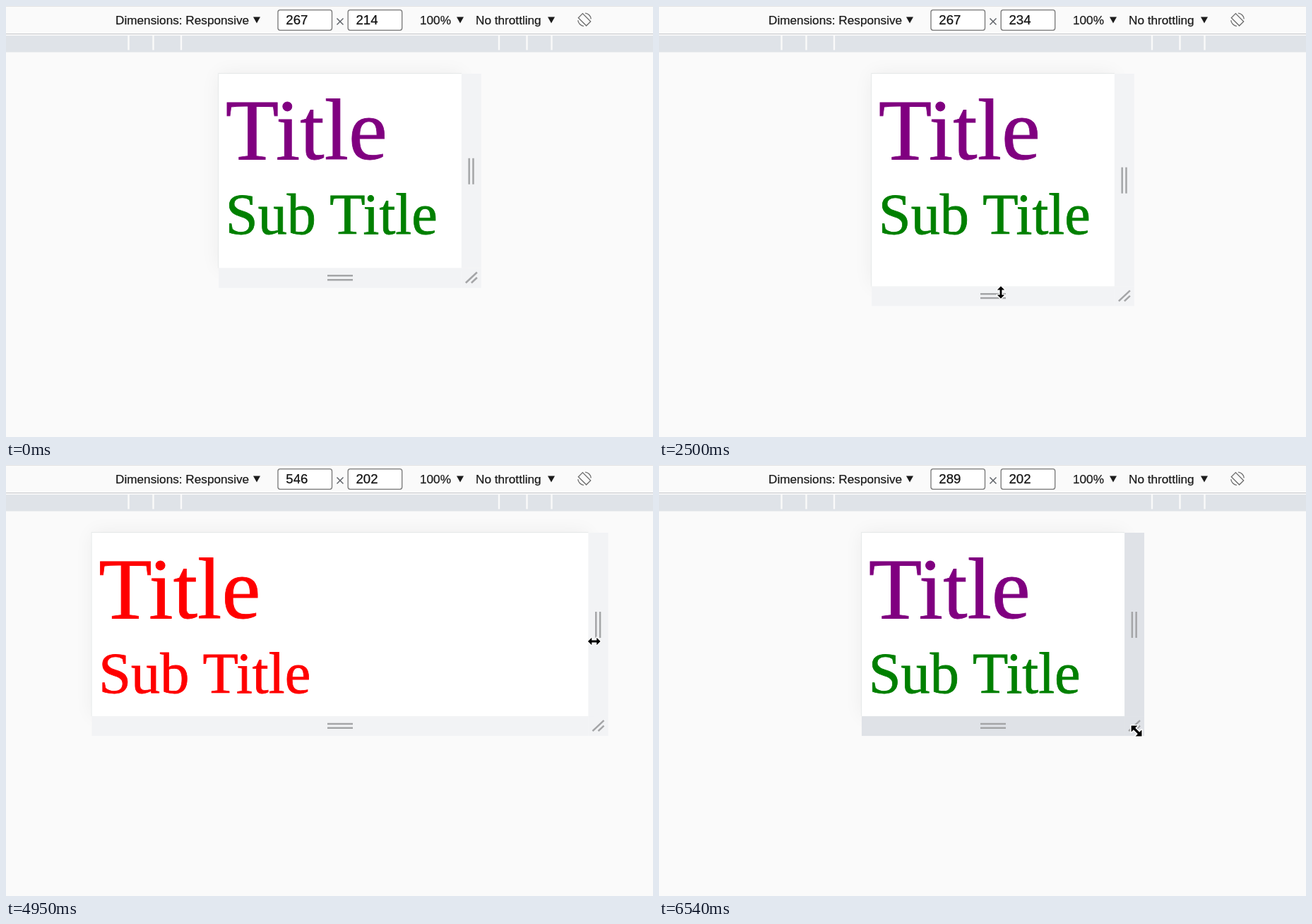
Write an HTML page with a canvas that moves like this. It is 916 px wide and 611 px high and loops after 6640 ms.

```html
<!DOCTYPE html>
<html lang="en">
<head>
<meta charset="utf-8">
<title>Responsive resize</title>
<style>
  html, body { margin: 0; width: 100%; height: 100%; overflow: hidden; background: #fafafa; }
  canvas { display: block; width: 916px; height: 611px; }
</style>
</head>
<body>
<canvas id="stage" width="916" height="611"></canvas>
<script>
const ctx = document.getElementById('stage').getContext('2d');
const LOOP = 6640, STEP = 50, LAST_CHANGE = 6540;
const SCALE = 1.2875, CENTER = 473, TOP = 96, BAR = 28, RED_FROM = 450;
const SANS = '"Liberation Sans", Arial, sans-serif';
const SERIF = '"Liberation Serif", "Times New Roman", serif';

const smooth = x => x * x * (3 - 2 * x);
const easeOut = x => 1 - (1 - x) ** 3;
const ease = (t, start, end, curve = smooth) =>
  curve(Math.min(1, Math.max(0, (t - start) / (end - start))));
const mix = (a, b, amount) => a + (b - a) * amount;

// Viewport size in CSS pixels: dragged taller, shorter, wider, then narrower.
const viewHeight = t => 214 + 98 * ease(t, 1310, 2050) - 110 * ease(t, 2200, 3090, easeOut);
const viewWidth = t => 267 + 279 * ease(t, 3800, 4657) - 257 * ease(t, 4950, 5589);
const bottomEdge = t => TOP + viewHeight(t) * SCALE;
const rightEdge = t => CENTER + viewWidth(t) * SCALE / 2;

// The pointer runs slightly ahead of the edge it drags.
function pointerAt(t) {
  const arrive = ease(t, 50, 850);
  const across = ease(t, 3050, 3700);
  const toCorner = ease(t, 5850, 6500);
  return {
    x: mix(484, rightEdge(t + 25) + 9 + 8 * toCorner, across),
    y: mix(bottomEdge(t + 60) + 20 + 121 * (1 - arrive), 250, across) + 127 * toCorner
  };
}

function pointerKind(t) {
  if (t >= 6400) return 'nwse';
  if (t >= 800 && t < 3050) return 'ns';
  if (t >= 5600 || (t >= 3650 && t < 5050)) return 'ew';
  return 'arrow';
}

function rect(color, x, y, w, h) {
  ctx.fillStyle = color;
  ctx.fillRect(x, y, w, h);
}

// A hairline outline gives the type a slightly heavier weight.
function text(value, x, y, size, color, family = SANS) {
  ctx.font = `${size}px ${family}`;
  ctx.fillStyle = ctx.strokeStyle = color;
  ctx.lineWidth = family === SERIF ? 0.8 : 0.25;
  ctx.fillText(value, x, y);
  ctx.strokeText(value, x, y);
}

function polygon(points) {
  ctx.beginPath();
  points.forEach(([x, y]) => ctx.lineTo(x, y));
  ctx.closePath();
}

function line(x1, y1, x2, y2) {
  ctx.beginPath();
  ctx.moveTo(x1, y1);
  ctx.lineTo(x2, y2);
  ctx.stroke();
}

function field(x, value) {
  ctx.beginPath();
  ctx.roundRect(x, 5.7, 76.5, 28.6, 3);
  ctx.fillStyle = '#fff';
  ctx.fill();
  ctx.strokeStyle = '#767676';
  ctx.lineWidth = 1.3;
  ctx.stroke();
  text(value, x + 11.3, 26, 18.6, '#111');
}

function dropdown(label, x, arrowX) {
  text(label, x, 25.6, 17.2, '#1c1c1c');
  polygon([[arrowX - 5, 15.5], [arrowX + 5, 15.5], [arrowX, 24.5]]);
  ctx.fill();
}

function rotateIcon() {
  ctx.save();
  ctx.translate(819, 19.3);
  ctx.strokeStyle = '#6b6b6b';
  ctx.lineWidth = 1.3;
  for (const start of [-1.45, 1.69]) {
    ctx.beginPath();
    ctx.arc(0, 0, 9.3, start, start + 1.35);
    ctx.stroke();
  }
  ctx.rotate(-Math.PI / 4);
  ctx.strokeRect(-4.3, -8, 8.6, 16);
  ctx.restore();
}

function toolbar(t) {
  rect('#e2e2e4', 0, 0, 916, 1);
  rect('#cbcdd0', 0, 39, 916, 1.2);
  rect('#dfe3e8', 0, 42, 916, 23.5);
  for (const offset of [225, 264.5, 299.5]) {
    for (const side of [-1, 1]) rect('#fafafa', CENTER + side * offset - 1.2, 42, 2.4, 20.5);
  }
  dropdown('Dimensions: Responsive', 155, 355);
  field(385, Math.round(viewWidth(t)));
  ctx.strokeStyle = '#5f6368';
  ctx.lineWidth = 1.5;
  line(468.5, 17.5, 477.5, 26.5);
  line(468.5, 26.5, 477.5, 17.5);
  field(484.2, Math.round(viewHeight(t)));
  dropdown('100%', 586, 643);
  dropdown('No throttling', 665, 772);
  rotateIcon();
}

function resizers(left, right, bottom, t) {
  const shade = active => active ? '#dfe2e7' : '#f2f3f5';
  const bottomHover = (t >= 800 && t < 1500) || t >= 6400;
  const rightHover = (t >= 3700 && t < 3900) || t >= 5600;
  rect(shade(rightHover), right, TOP, BAR, bottom - TOP);
  rect(shade(bottomHover), left, bottom, right - left, BAR);
  rect(shade(t >= LAST_CHANGE), right, bottom, BAR, BAR);

  const middle = (TOP + bottom) / 2;
  ctx.strokeStyle = '#a4a5a7';
  ctx.lineWidth = 2.5;
  for (const offset of [10.8, 16.6]) {
    line(right + offset, middle - 18, right + offset, middle + 19);
    line(CENTER - 18, bottom + offset, CENTER + 18, bottom + offset);
  }
  line(right + 6, bottom + 21, right + 22, bottom + 6);
  line(right + 14, bottom + 21, right + 22, bottom + 13.5);
}

function page(width, bottom) {
  const left = CENTER - width * SCALE / 2, x = left + 8 * SCALE - 0.6;
  const red = width >= RED_FROM;
  rect('#fff', left, TOP, width * SCALE, bottom - TOP);
  text('Title', x, 217, 96 * SCALE, red ? '#f00' : '#800080', SERIF);
  text('Sub Title', x, 322.5, 64 * SCALE, red ? '#f00' : '#008000', SERIF);
}

function cursor(t) {
  const { x, y } = pointerAt(t), kind = pointerKind(t);
  ctx.save();
  ctx.translate(x, y);
  if (kind === 'arrow') {
    polygon([[0, 0], [0, 16.5], [3.8, 13], [6.8, 20], [9.6, 18.8], [6.7, 12], [11.6, 11.6]]);
  } else {
    ctx.rotate({ ew: 0, ns: Math.PI / 2, nwse: Math.PI / 4 }[kind]);
    if (kind === 'nwse') ctx.scale(1.2, 1.2);
    const half = [[3.5, -1.4], [3.5, -5.2], [8.8, 0], [3.5, 5.2], [3.5, 1.4]];
    polygon([...half, ...half.map(([px, py]) => [-px, -py])]);
  }
  ctx.lineJoin = 'round';
  ctx.strokeStyle = '#fff';
  ctx.lineWidth = 2.6;
  ctx.stroke();
  ctx.fillStyle = '#000';
  ctx.fill();
  ctx.restore();
}

function draw(t) {
  const right = rightEdge(t), left = 2 * CENTER - right, bottom = bottomEdge(t);
  // While the frame narrows, the page trails behind it.
  const pageWidth = Math.max(viewWidth(t), viewWidth(t - 35));

  rect('#fafafa', 0, 0, 916, 611);
  ctx.save();
  ctx.shadowColor = 'rgba(0, 20, 20, 0.06)';
  ctx.shadowBlur = 26;
  rect('#fff', left, TOP, right - left, bottom - TOP);
  ctx.restore();
  rect('#dfe3e3', left - 0.7, TOP - 0.7, right - left + 0.7, bottom - TOP + 0.7);
  toolbar(t);
  resizers(left, right, bottom, t);
  page(pageWidth, bottom);
  if (t >= STEP) cursor(t);
}

function tick(now) {
  const t = now % LOOP;
  draw(t >= LAST_CHANGE ? LAST_CHANGE : Math.min(6450, Math.floor(t / STEP) * STEP));
  requestAnimationFrame(tick);
}

ctx.fontKerning = 'normal';
tick(0);
</script>
</body>
</html>
```
